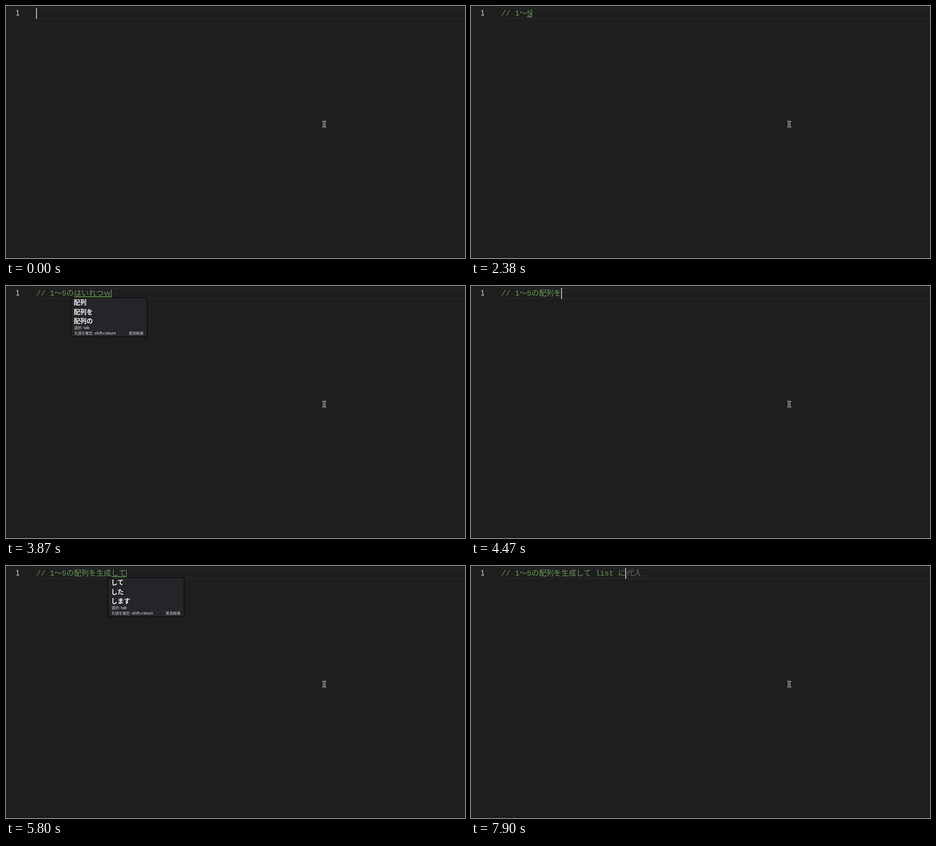
Write an HTML page with a canvas that moves like this. It is 1009x555 px and loops after 8 s.

```html
<!DOCTYPE html>
<html lang="ja">
<head>
<meta charset="utf-8">
<style>
html, body { margin: 0; height: 100%; overflow: hidden; background: #1e1e1e; }
canvas { display: block; }
</style>
</head>
<body>
<canvas id="stage" width="1009" height="555"></canvas>
<script>
const ctx = document.getElementById('stage').getContext('2d');
const LOOP = 8000, LEFT = 66.9, BASE = 21, HALF = 9.9, FULL = 16.4;
const CJK = '"Noto Sans CJK JP", "Noto Sans CJK", sans-serif';
const MONO = '"Liberation Mono", monospace';
const GREEN = '#6a9955';

// Popups: width, then the candidates
const one = [151, '1', '１', '一'];
const from = [151, 'から', '〜', '：'];
const five = [161, '5', '５', '五'];
const no = [151, 'の', 'のは', 'ので'];
const array = [169, '配列', '配列を', '配列の'];
const create = [168, '生成', '設定', '制限'];
const doing = [168, 'して', 'した', 'します'];
const into = [167, 'に', '2', '日'];

// Editor states: start time, committed text, composed text, options
const states = [
  [0, ''],
  [150, '//'],
  [300, '// '],
  [740, '// ', '1'],
  [890, '// ', '1', { popup: one }],
  [1040, '// 1'],
  [1190, '// 1', 'ｋ'],
  [1330, '// 1', 'か', { popup: from }],
  [1480, '// 1', 'から', { popup: from }],
  [1630, '// 1', '〜', { selected: true }],
  [2080, '// 1〜'],
  [2380, '// 1〜', '5'],
  [2520, '// 1〜', '5', { popup: five }],
  [2820, '// 1〜5', 'の', { popup: no }],
  [2970, '// 1〜5の'],
  [3120, '// 1〜5の', 'ｈ'],
  [3270, '// 1〜5の', 'は', { popup: array }],
  [3420, '// 1〜5の', 'はい', { popup: array }],
  [3570, '// 1〜5の', 'はいれ', { popup: array }],
  [3720, '// 1〜5の', 'はいれつ', { popup: array }],
  [3870, '// 1〜5の', 'はいれつｗ', { popup: array }],
  [4020, '// 1〜5の', 'はいれつを', { popup: array }],
  [4170, '// 1〜5の', '配列を', { selected: true }],
  [4470, '// 1〜5の配列を'],
  [4620, '// 1〜5の配列を', 'ｓ'],
  [4770, '// 1〜5の配列を', 'せ', { popup: create }],
  [4920, '// 1〜5の配列を', 'せい', { popup: create }],
  [5070, '// 1〜5の配列を', 'せいせい', { popup: create }],
  [5220, '// 1〜5の配列を', '生成', { selected: true }],
  [5370, '// 1〜5の配列を生成'],
  [5510, '// 1〜5の配列を生成', 'ｓ'],
  [5650, '// 1〜5の配列を生成', 'し', { popup: doing }],
  [5800, '// 1〜5の配列を生成', 'して', { popup: doing }],
  [5950, '// 1〜5の配列を生成して'],
  [6100, '// 1〜5の配列を生成して '],
  [6550, '// 1〜5の配列を生成して ', '', { blink: true }],
  [6700, '// 1〜5の配列を生成して l'],
  [6850, '// 1〜5の配列を生成して li'],
  [7000, '// 1〜5の配列を生成して list'],
  [7150, '// 1〜5の配列を生成して list '],
  [7600, '// 1〜5の配列を生成して list ', 'ｎ'],
  [7750, '// 1〜5の配列を生成して list ', 'に', { popup: into }],
  [7900, '// 1〜5の配列を生成して list に', '', { ghost: '代入' }]
];

function rect(x, y, w, h, color) {
  ctx.fillStyle = color;
  ctx.fillRect(x, y, w, h);
}

function label(text, x, y, font, color) {
  ctx.font = font;
  ctx.fillStyle = color;
  ctx.fillText(text, x, y);
}

// Draws text on the editor line and returns the x of its end
function write(text, x, color, style = '') {
  for (const ch of text) {
    const half = ch < '\u0100';
    label(ch, x, BASE, half ? `${style} 16.5px ${MONO}` : `${style} ${FULL}px ${CJK}`, color);
    x += half ? HALF : FULL;
  }
  return x;
}

function widthOf(text) {
  return [...text].reduce((sum, ch) => sum + (ch < '\u0100' ? HALF : FULL), 0);
}

function drawPopup(x, [width, ...words]) {
  const left = Math.round(x - 7);
  ctx.beginPath();
  ctx.roundRect(left + .5, 25.5, width - 1, 86.5, 2);
  ctx.fillStyle = '#242528';
  ctx.fill();
  ctx.strokeStyle = '#080808';
  ctx.lineWidth = 1.4;
  ctx.stroke();
  words.forEach((word, i) => label(word, left + 7, 41 + i * 20.5, `600 14px ${CJK}`, '#f4f4f4'));
  const small = `500 8px ${CJK}`, keys = '500 8.4px Inter, sans-serif', gray = '#d2d2d3';
  label('選択:', left + 8, 95, small, gray);
  label('tab', left + 28.5, 95, keys, gray);
  label('先頭を確定:', left + 8, 107, small, gray);
  label('shift+return', left + 52.5, 107, keys, gray);
  label('推測候補', left + width - 41, 107, small, gray);
}

function drawPointer() {
  const path = new Path2D('M697 254.5Q699.5 254.5 699.5 257V263.5Q699.5 266 697 266M702 254.5Q699.5 254.5 699.5 257M699.5 263.5Q699.5 266 702 266M698 260.5H701');
  ctx.lineCap = 'square';
  for (const [width, color] of [[3, '#d0d0d0'], [1.2, '#111']]) {
    ctx.lineWidth = width;
    ctx.strokeStyle = color;
    ctx.stroke(path);
  }
}

function draw(time) {
  const [, done, input = '', opts = {}] = states.findLast(s => s[0] <= time);
  rect(0, 0, 1009, 555, '#1e1e1e');
  rect(0, 552, 1009, 3, '#1a1a1a');
  ctx.strokeStyle = '#282828';
  ctx.lineWidth = 1.6;
  ctx.strokeRect(67, 5, 960, 22.3);
  label('1', 20.3, BASE, '16.4px "DejaVu Sans Mono", monospace', '#c6c6c6');

  const start = write(done, LEFT, GREEN);
  const width = widthOf(input);
  if (opts.selected) rect(start + .5, 4, width, 24.5, '#5a7fb5');
  const end = write(input, start, GREEN);
  if (input) {
    rect(start + .6, opts.selected ? 23 : 22.8, width - .8, opts.selected ? 1 : 2, GREEN);
    if (!opts.selected) rect(Math.round(end), 7, 1, 18, '#93a988');
  } else if (!opts.blink) {
    rect(Math.round(end - .6), 4, 2, 24.5, '#bcbcb8');
  }
  if (opts.ghost) write(opts.ghost, end + .5, '#6c6c6c', 'italic');
  if (opts.popup) drawPopup(start, opts.popup);
  drawPointer();
}

const begin = performance.now();
function tick() {
  draw((performance.now() - begin) % LOOP);
  requestAnimationFrame(tick);
}
tick();
</script>
</body>
</html>
```
